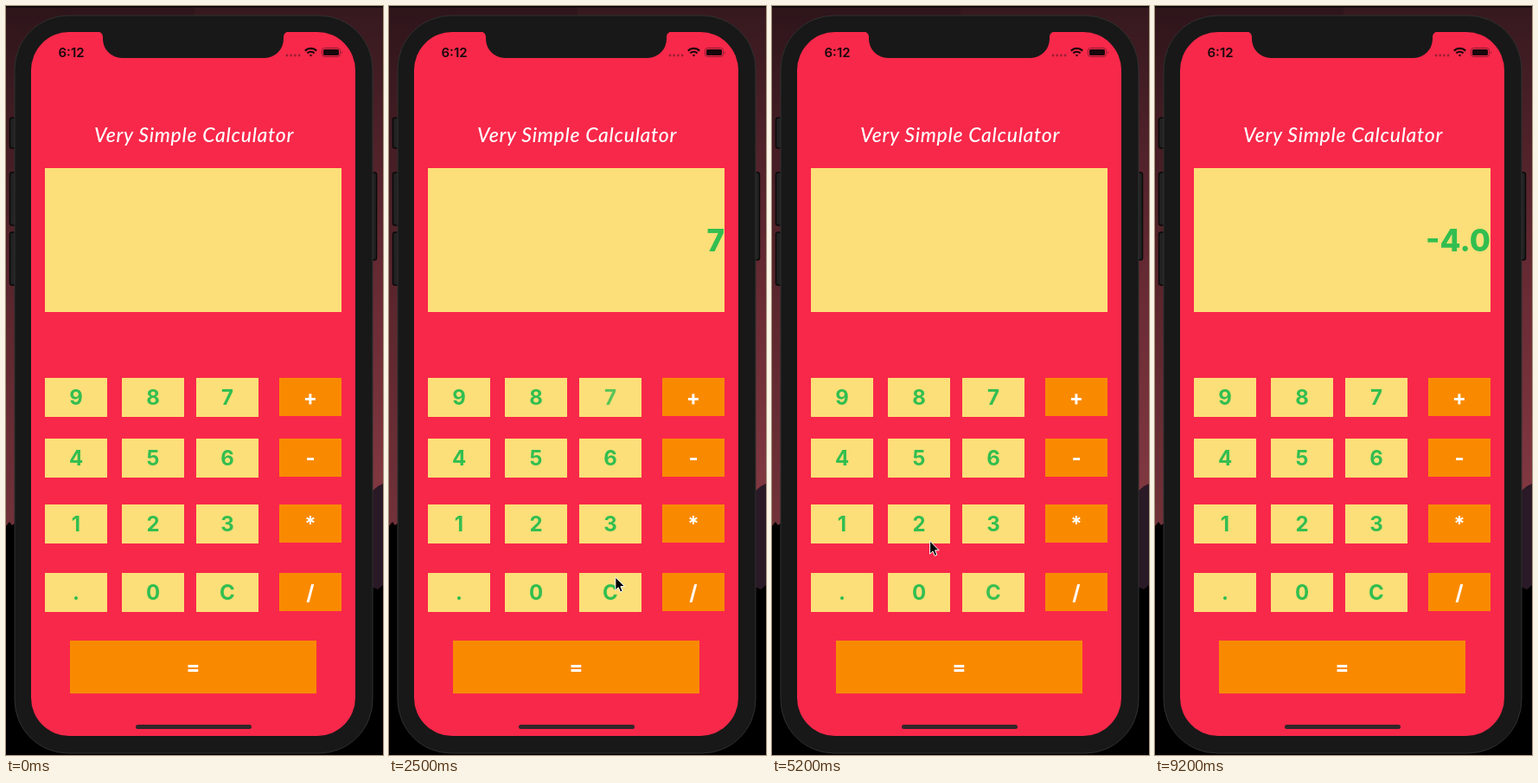
An HTML page for the animation above (9.4 s loop, 436 px wide and 864 px high).

```html
<!DOCTYPE html>
<html lang="en">
<head>
<meta charset="utf-8">
<title>Very Simple Calculator</title>
<style>
html, body { margin: 0; width: 100%; height: 100%; overflow: hidden; background: #000; }
svg { display: block; width: 436px; height: 864px; }
text { font-family: Inter, "Open Sans", sans-serif; }
.key { font-size: 24px; font-weight: 700; text-anchor: middle; }
.title { font: italic 500 23px Lato, sans-serif; letter-spacing: .7px; fill: #fff; }
.clock { font-size: 15px; font-weight: 600; fill: #17080c; }
.display { font-size: 35px; font-weight: 800; text-anchor: end; fill: #32be50; }
</style>
</head>
<body>
<svg viewBox="0 0 436 864">
  <defs>
    <linearGradient id="sky" x2="0" y2="1">
      <stop offset="0" stop-color="#35191e"/>
      <stop offset=".15" stop-color="#4b2028"/>
      <stop offset=".4" stop-color="#6b2c35"/>
      <stop offset=".7" stop-color="#853a43"/>
    </linearGradient>
  </defs>

  <rect width="436" height="864" fill="url(#sky)"/>
  <rect width="218" height="864" fill="#000" opacity=".14"/>
  <rect width="436" height="1.5" fill="#080405"/>
  <path d="M436 551l-6 3-6 5V680h12z" fill="#2a1926"/>
  <path d="M0 600l4-5 3 4 4-3V864H0zM436 668l-6 5-7-3V864h13z" fill="#000"/>
  <path d="M0 780H436V864H0z" fill="#000"/>

  <g fill="#222" stroke="#090909" stroke-width="1.5">
    <rect x="4.5" y="129" width="10" height="35" rx="2.5"/>
    <rect x="4.5" y="192" width="10" height="61" rx="2.5"/>
    <rect x="4.5" y="261" width="10" height="61" rx="2.5"/>
    <rect x="418" y="192" width="10.5" height="101" rx="2.5"/>
  </g>
  <rect x="10" y="11" width="414" height="851" rx="62" fill="#181818" stroke="#303030"/>
  <rect x="29" y="30" width="375" height="812" rx="44" fill="#f8284a"/>
  <path d="M106 29.5a6 6 0 0 1 6 6V38a22 22 0 0 0 22 22H299a22 22 0 0 0 22-22V35.5a6 6 0 0 1 6-6z" fill="#181818"/>

  <text class="clock" x="60.5" y="58.5">6:12</text>
  <path d="M325 57h15" stroke="#9b1e35" stroke-width="2.8" stroke-linecap="round" stroke-dasharray="0 4.7"/>
  <g fill="none" stroke="#17080c" stroke-width="2.2">
    <path d="M345.8 51.6a9.6 9.6 0 0 1 13.4 0M348.4 54.4a5.9 5.9 0 0 1 8.2 0"/>
    <path d="M350.6 56.2h3.8l-1.9 2.2z" fill="#17080c" stroke="none"/>
  </g>
  <rect x="365.5" y="48.5" width="21" height="10" rx="3" fill="none" stroke="#8c1b31"/>
  <rect x="367" y="50" width="18" height="7" rx="1.6" fill="#17080c"/>
  <path d="M388 51.5q1.6 2 0 4z" fill="#8c1b31"/>

  <text class="title" x="102" y="157">Very Simple Calculator</text>
  <rect x="45" y="187" width="343" height="166" fill="#fcdf78"/>
  <text class="display" id="display" x="388" y="283"></text>
  <g id="keys"></g>
  <rect x="150" y="829" width="134" height="5" rx="2.5" fill="#33262a"/>
  <path id="cursor" d="M0 0V15L3.4 11.9 5.7 17.2 8.2 16.1 6 10.8H10.6z"
    fill="#000" stroke="#fff" stroke-linejoin="round"/>
</svg>
<script>
const LOOP = 9400, STEP = 100;
const PRESS = 100, FADE = 400, TRAVEL = 500;
const NS = "http://www.w3.org/2000/svg";
const display = document.getElementById("display");
const cursor = document.getElementById("cursor");
const layer = document.getElementById("keys");
const keys = {};

function add(tag, attrs) {
  const el = document.createElementNS(NS, tag);
  for (const name in attrs) el.setAttribute(name, attrs[name]);
  return layer.appendChild(el);
}

function addKey(label, x, y, width, height, isOp) {
  add("rect", { x, y, width, height, fill: isOp ? "#f98a00" : "#fcdf78" });
  const cx = x + width / 2, cy = y + height / 2;
  const text = add("text", { class: "key", x: cx, y: cy + 8.5, fill: isOp ? "#fff" : "#32be50" });
  text.textContent = label;
  keys[label] = { text, x: cx, y: cy + 8 };
}

const columns = [45, 134, 220, 316];
const rows = { "987+": 429, "456-": 499, "123*": 575, ".0C/": 654 };
for (const row in rows)
  [...row].forEach((label, i) => addKey(label, columns[i], rows[row], 72, i < 3 ? 45 : 44, i === 3));
addKey("=", 74, 732, 285, 61, true);
Object.assign(keys["="], { x: 265, y: 764 });
Object.assign(keys["+"], { x: 336, y: 444 });

// The pointer waits at each stop until `leave`; a key is released then.
const stops = [
  { leave: 100, x: 424, y: 610 },
  { leave: 1000, key: "8", shown: "8" },
  { leave: 1640, key: "+", shown: "8" },
  { leave: 2200, key: "7", shown: "7" },
  { leave: 2800, key: "=", shown: "15.0" },
  { leave: 3700, x: 332, y: 733 },
  { leave: 4825, key: "C", shown: "" },
  { leave: 5675, key: "2", shown: "2" },
  { leave: 6300, key: "-", shown: "2" },
  { leave: 7000, key: "6", shown: "6" },
  { leave: 7900, key: "=", shown: "-4.0" },
  { leave: 8700, key: "=" }
];
const presses = stops.filter(s => s.shown !== undefined);
const place = stop => stop.key ? keys[stop.key] : stop;

function pointerAt(t) {
  const i = stops.findIndex(s => s.leave > t);
  const from = place(stops[i - 1]), to = place(stops[i]);
  const u = Math.min(1, (t - stops[i - 1].leave) / TRAVEL);
  const k = (1 - Math.cos(Math.PI * u)) / 2;
  return [from.x + (to.x - from.x) * k, from.y + (to.y - from.y) * k];
}

function draw(t) {
  const alpha = {};
  let result = "";
  for (const { leave, key, shown } of presses) {
    if (t >= leave) result = shown;
    if (t >= leave - PRESS && t < leave + FADE)
      alpha[key] = .2 + .8 * Math.max(0, t - leave) / FADE;
  }
  for (const label in keys) keys[label].text.setAttribute("opacity", alpha[label] ?? 1);
  display.textContent = result;

  const visible = t >= stops[0].leave && t < stops.at(-1).leave;
  cursor.setAttribute("visibility", visible ? "visible" : "hidden");
  if (visible) cursor.setAttribute("transform", `translate(${pointerAt(t)})`);
}

const start = performance.now();
function tick() {
  const t = (performance.now() - start) % LOOP;
  draw(Math.floor(t / STEP) * STEP);
  requestAnimationFrame(tick);
}
tick();
</script>
</body>
</html>
```
